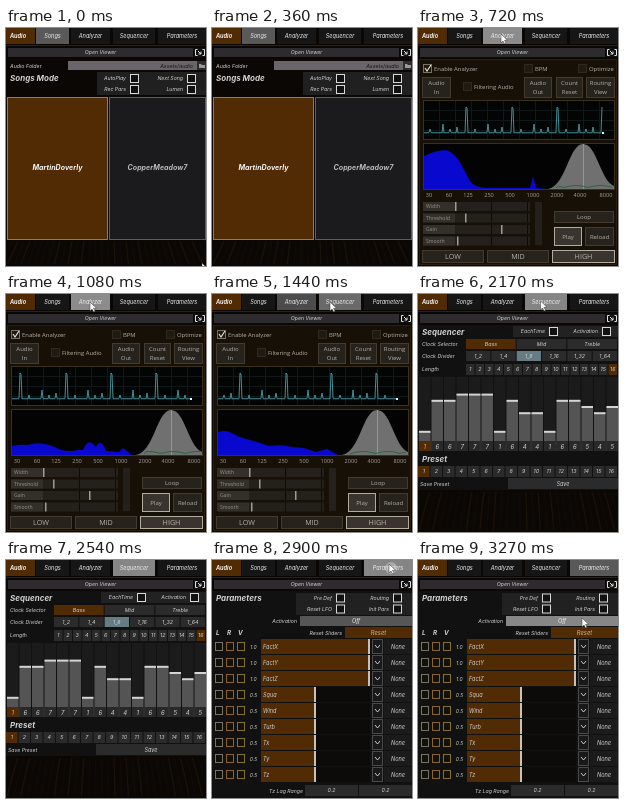
These frames come from a looping animation (200x238 px, 3.64 s). An HTML page:

```html
<!DOCTYPE html>
<html lang="en">
<head>
<meta charset="utf-8">
<title>Audio panel</title>
<style>
html, body { margin: 0; width: 100%; height: 100%; overflow: hidden; background: #0b0704; }
svg { display: block; width: 200px; height: 238px; }
text { font-family: Inter, "Open Sans", sans-serif; }
.plain text { font-family: "Open Sans", "DejaVu Sans", sans-serif; }
</style>
</head>
<body>
<svg id="stage" viewBox="0 0 200 238"></svg>
<script>
const LOOP = 3640;
const BROWN = '#502b04', LIGHT = '#d2d2d2';

const rect = (x, y, w, h, fill, stroke) => stroke
  ? `<rect x="${x + .5}" y="${y + .5}" width="${w - 1}" height="${h - 1}" fill="${fill}" stroke="${stroke}"/>`
  : `<rect x="${x}" y="${y}" width="${w}" height="${h}" fill="${fill}"/>`;
const path = (d, fill, stroke = 'none', width = 1) =>
  `<path d="${d}" fill="${fill}" stroke="${stroke}" stroke-width="${width}"/>`;
const text = (x, y, size, str, { anchor = 'start', fill = LIGHT, bold, italic = true } = {}) =>
  `<text x="${x}" y="${y}" font-size="${size}" text-anchor="${anchor}" fill="${fill}"` +
  `${bold ? ' font-weight="700"' : ''}${italic ? ' font-style="italic"' : ''}>${str}</text>`;
const mid = (x, y, size, str, opts) => text(x, y, size, str, { anchor: 'middle', ...opts });
const title = (y, str) => text(4, y, 8, str, { bold: true });
const button = (x, y, w, h, str, fill = '#292929', size = 5.3, opts) =>
  rect(x, y, w, h, fill) + mid(x + w / 2, y + h / 2 + size * .36, size, str, opts);
const range = (n, fn) => Array.from({ length: n }, (_, i) => fn(i)).join('');

// An empty box with its label ending left of it.
const option = (x, y, str) =>
  text(x - 4, y + 6, 5.2, str, { anchor: 'end' }) + rect(x, y, 9, 9, '#111', '#d8d8d8');

const cursor = (x, y) =>
  path(`M${x} ${y}v9l2-2 1.6 3 1.5-.8-1.6-2.9h3z`, '#fff', '#333', .5);
const halo = (x, y, fill, ring = 'none') =>
  `<circle cx="${x}" cy="${y}" r="6" fill="${fill}"/>` +
  `<circle cx="${x}" cy="${y}" r="8.5" fill="none" stroke="${ring}"/>`;

function streaks(top) {
  return range(34, i => {
    const a = (i * 37 % 34) * 6, drift = (a - 100) * .12;
    return path(`M${a} ${top}q${drift / 3} 8 ${drift} ${236 - top}`, 'none', i % 3 ? '#120b05' : '#1c1107', 1.4);
  });
}

function header(tints) {
  const tabs = [[0, 29, 'Audio'], [30, 33, 'Songs'], [65, 39, 'Analyzer'], [107, 42, 'Sequencer'], [152, 48, 'Parameters']];
  return rect(0, 0, 200, 238, '#0b0704') +
    tabs.map(([x, w, str], i) =>
      rect(x, 0, w, 16, tints[i] || (i ? '#161616' : BROWN)) +
      mid(x + w / 2 - (i ? 0 : 2.5), 10.2, 5.6, str, { fill: '#f2f2f2', bold: !i })).join('') +
    rect(0, 17, 200, 1, '#27221b') +
    button(2, 20, 185, 9, 'Open Viewer', '#2d2b2d', 5.2) +
    rect(188, 20, 12, 9, '#111') +
    path('M191.5 21.5h-2v6h2M196.5 21.5h2v6h-2M192 23l3 3m0-2.5v2.5h-2.5', 'none', '#e2e2e2', 1);
}

function songs() {
  return header({ 1: '#595959' }) +
    text(4, 39.5, 5.3, 'Audio Folder') +
    rect(62, 33, 129, 9, '#69656a') + text(187, 39.5, 5.3, 'Assets/audio', { anchor: 'end', fill: '#161616' }) +
    rect(191, 33, 9, 9, '#2c2c2c') + path('M193 36h2l1 1h3v3h-6z', '#999') +
    title(52.5, 'Songs Mode') + rect(91, 44, 109, 23, '#202020') +
    option(124, 46, 'AutoPlay') + option(181, 46, 'Next Song') +
    option(124, 57, 'Rec Pars') + option(181, 57, 'Lumen') +
    rect(1, 69, 101, 143, BROWN, '#8f7c62') + rect(103, 69, 97, 143, '#1b1b1d', '#5d5d5d') +
    mid(51.5, 142, 7.1, 'MartinDoverly', { bold: true, fill: '#f4f4f4' }) +
    mid(151.5, 142, 7.1, 'CopperMeadow7', { bold: true, fill: '#bbb' }) + streaks(213);
}

// Beats scroll left; shift is the x of one beat.
function wave(shift) {
  const ticks = { 0: 26, 1: 25, 9: 4, 22: 9, 29: 4, 36: 6 };
  let d = 'M6 105';
  for (let x = 7; x < 185; x++) {
    const p = Math.floor((x - shift + 453) % 45.3);
    d += `L${x} ${105 - (ticks[p] || x % 2 * .5)}`;
  }
  return rect(5, 72, 192, 40, '#030505', '#3a3020') +
    range(11, i => rect(21 + i * 16, 73, 1, 38, '#10181a')) +
    range(3, i => rect(6, 82 + i * 10, 190, 1, '#10181a')) +
    path(d, 'none', '#4a9ca4', .9) + rect(184, 104, 2, 2, '#e8ffff');
}

const blues = [
  'M6 161V128Q18 122 28 122Q36 124 43 136L52 153Q56 159 68 160H112L115 148L118 160L130 161z',
  'M6 161V152Q15 150 22 151Q30 148 38 150Q46 151 55 156Q63 158 72 156L77 156Q81 146 86 149L90 153Q95 143 100 157L113 158L117 154L126 161z',
  'M6 161V138Q15 135 25 142Q34 145 45 148L57 152Q70 150 80 153L92 154L104 158L115 155L126 161z',
  'M6 161V128Q14 133 24 139Q32 143 40 143L52 147Q68 149 82 148L87 153Q93 150 98 156L107 158L115 156L126 161z'
];

function spectrum(i) {
  let green = 'M138 160';
  for (let x = 140; x < 196; x += 2)
    green += `L${x} ${(159.5 - Math.abs(Math.sin(x * 1.7 + i * 2)) * 2).toFixed(1)}`;
  const labels = [30, 60, 125, 250, 500, 1000, 2000, 4000, 8000], at = [11, 31, 50, 71, 92, 115, 139, 162, 188];
  return rect(5, 115, 192, 47, '#030303', '#3a3020') +
    path('M130 161C148 158 151 116 165 116C179 116 182 152 196 158V161z', '#707070') +
    path('M165.5 116V161', 'none', '#969696') +
    path(blues[i], '#0808cf') + path(green, 'none', '#17682f', .8) +
    labels.map((n, k) => mid(at[k], 168.5, 5.6, n, { italic: false, fill: '#a5a098' })).join('');
}

function analyzer(i, shift, tints) {
  const plain = { italic: false, fill: '#b5b0a6' }, face = '#26221c', edge = '#423b30';
  const check = (x, y, str, on) =>
    rect(x, y, 9, 9, '#1f1a13', on ? '#77736a' : '#30291e') + text(x + 11, y + 7, 5.9, str, plain) +
    (on ? path(`M${x + 2} ${y + 4}l2 3 4-6`, 'none', '#e4e1d8', 1.2) : '');
  const push = (x, w, a, b) => rect(x, 49, w, 21, face, edge) +
    mid(x + w / 2, 57.2, 6, a, plain) + mid(x + w / 2, 66.2, 6, b, plain);
  const box = (x, y, w, h, str, lit, size = 6) =>
    rect(x, y, w, h, lit ? '#39352e' : face, lit ? '#b0aca2' : edge) +
    mid(x + w / 2, y + h / 2 + size * .36, size, str, plain);
  const sliders = [['Width', 37], ['Threshold', 47], ['Gain', 83], ['Smooth', 39]];
  return header(tints) + '<g class="plain">' + rect(1, 31, 198, 206, '#171007', '#2c1d0b') +
    check(5, 36, 'Enable Analyzer', true) + check(106, 36, 'BPM') +
    check(160, 36, 'Optimize') + check(45, 54, 'Filtering Audio') +
    push(4, 29, 'Audio', 'In') + push(106, 28, 'Audio', 'Out') +
    push(138, 27, 'Count', 'Reset') + push(168, 29, 'Routing', 'View') +
    wave(shift) + spectrum(i) +
    sliders.map(([str, x], k) => {
      const y = 174 + k * 11.5;
      return rect(5, y, 107, 9, '#24211c') + rect(5, y, 32, 9, '#33302b') +
        rect(73, y, 1, 9, '#0f0b06') + rect(109, y, 1, 9, '#0f0b06') +
        text(8, y + 6.3, 5.1, str, { ...plain, fill: '#98948b' }) + rect(x, y, 1.5, 9, '#a09c94');
    }).join('') +
    rect(117, 174, 7, 43, '#24211c') + box(136, 183, 60, 12, 'Loop') +
    box(136, 199, 28, 19, 'Play', true) + box(167, 199, 29, 19, 'Reload') +
    box(4, 222, 62, 13, 'LOW', false, 7.2) + box(69, 222, 62, 13, 'MID', false, 7.2) +
    box(134, 222, 63, 13, 'HIGH', true, 7.2) + '</g>';
}

function sequencer() {
  const levels = [1, 6, 6, 7, 7, 7, 1, 6, 4, 4, 1, 6, 6, 5, 4, 5];
  const row = (x, y, h, names, on, tint = BROWN) => {
    const w = (200 - x) / names.length;
    return names.map((s, i) => button(x + i * w, y, w - 1, h, s, i === on ? tint : '#2b2b2b')).join('');
  };
  const steps = levels.map((_, i) => i + 1);
  return header({ 3: '#858585' }) + rect(0, 31, 200, 165, '#111') +
    title(40.5, 'Sequencer') + rect(95, 32, 105, 11, '#222') +
    option(131, 33, 'EachTime') + option(184, 33, 'Activation') +
    text(4, 52, 5.2, 'Clock Selector') + row(48, 45, 10, ['Bass', 'Mid', 'Treble'], 0) +
    text(4, 64, 5.2, 'Clock Divider') +
    row(48, 57, 10, ['1_2', '1_4', '1_8', '1_16', '1_32', '1_64'], 2, '#667c84') +
    text(4, 77, 5.2, 'Length') + row(48, 70, 11, steps, 15) +
    levels.map((v, i) => {
      const x = 1 + i * 12.5, top = 144 - 6.2 * v;
      return rect(x, 83, 11.5, 74, '#1b1b1b') + rect(x, top, 11.5, 157 - top, '#545454') +
        rect(x, top - 1, 11.5, 2, '#d5d5d5') + rect(x, 147, 11.5, 10, i ? '#292929' : BROWN) +
        mid(x + 5.75, 154.7, 6, v, { fill: i ? LIGHT : '#f0a850' });
    }).join('') +
    title(168, 'Preset') + row(0, 172, 11, steps, 0) +
    text(2, 191.5, 5.2, 'Save Preset') + button(90, 184, 110, 11, 'Save', '#2b2b2b', 5.6) + streaks(198);
}

function parameters(tab, bar) {
  const names = ['FactX', 'FactY', 'FactZ', 'Squa', 'Wind', 'Turb', 'Tx', 'Ty', 'Tz'];
  return header({ 4: tab }) + rect(0, 31, 200, 207, '#111') +
    title(40.5, 'Parameters') + rect(84, 33, 116, 22, '#212121') +
    option(124, 33.5, 'Pre Def') + option(181, 33.5, 'Routing') +
    option(124, 44.5, 'Reset LFO') + option(181, 44.5, 'Init Pars') +
    text(85, 62.5, 5.2, 'Activation', { anchor: 'end' }) +
    button(88, 56, 112, 10, 'Off', bar, 5.6, { fill: '#f0f0f0' }) +
    text(130, 74.5, 5.3, 'Reset Sliders', { anchor: 'end' }) +
    button(133, 67, 67, 11, 'Reset', BROWN, 5.8, { fill: '#e4b98a' }) +
    ['L', 'R', 'V'].map((s, i) => text(4 + i * 11, 75, 6.3, s, { bold: true })).join('') +
    names.map((s, i) => {
      const y = 79 + i * 16, full = i < 3, end = full ? 157 : 103;
      return range(3, k => rect(3 + k * 11, y + 3, 8, 9, '#14110c', ['#77736a', '#8b642b', '#827236'][k])) +
        mid(41.5, y + 9.5, 5, full ? '1.0' : '0.5') +
        rect(49, y, 109, 15, '#0d0b09') + rect(49, y, end - 49, 15, BROWN) + rect(end - 1, y, 2, 15, '#c8c0b4') +
        text(51, y + 9.5, 5.5, s) +
        rect(160, y, 11, 15, '#191919', '#4b4b4b') + path(`M163 ${y + 6}l2.5 3 2.5-3`, 'none', '#ddd', .9) +
        button(172, y, 28, 15, 'None', '#1b1b1b', 5.6);
    }).join('') +
    text(91, 232.5, 5.2, 'Tz Lag Range', { anchor: 'end' }) +
    button(93, 225, 53, 11, '0.2', '#2b2b2b') + button(147, 225, 53, 11, '0.2', '#2b2b2b');
}

const scenes = [
  [0, songs() + cursor(196, 235)],
  [360, songs()],
  [720, analyzer(0, 48, { 2: '#8c8c8c' }) + cursor(83, 6)],
  [1080, analyzer(1, 14, { 2: '#8c8c8c' }) + cursor(84, 8)],
  [1440, analyzer(2, 28, { 2: '#4c4c4c', 3: '#6a6a6a' }) + cursor(118, 8)],
  [1800, analyzer(3, 41, { 2: '#4c4c4c', 3: '#6a6a6a' }) + halo(123, 9, '#cdbb35c0', '#e0dcc0') + cursor(123, 8)],
  [2170, sequencer() + cursor(122.5, 7)],
  [2540, sequencer()],
  [2900, parameters('#858585', '#565656') + halo(179, 8, '#d8d8d870') + cursor(177, 4)],
  [3270, parameters('#595959', '#878787') + cursor(164, 58)]
];

const stage = document.getElementById('stage');
let shown;
function tick() {
  const t = performance.now() % LOOP;
  const [start, art] = scenes.findLast(([from]) => from <= t);
  if (start !== shown) {
    stage.innerHTML = art;
    shown = start;
  }
  requestAnimationFrame(tick);
}
tick();
</script>
</body>
</html>
```
